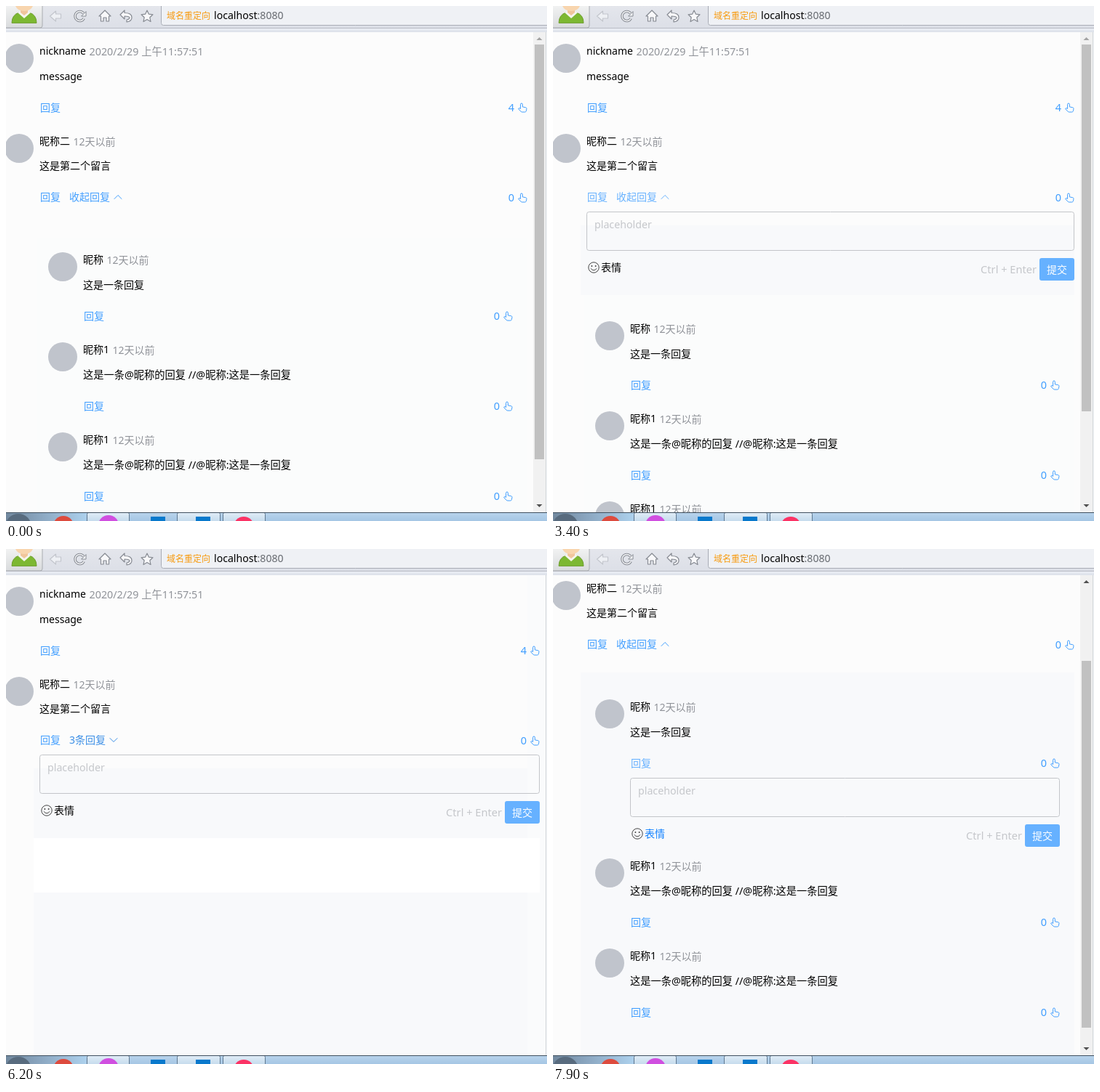
Recreate the animation shown at these times as an HTML page with a canvas. Size 744x709 px, loop 8 s.

```html
<!DOCTYPE html>
<html lang="zh-CN">
<head>
<meta charset="utf-8">
<title>留言板</title>
<style>
html, body { margin: 0; width: 100%; height: 100%; overflow: hidden; background: #fcfcfc; }
canvas { display: block; }
</style>
</head>
<body>
<canvas id="stage" width="744" height="709"></canvas>
<script>
const ctx = document.getElementById('stage').getContext('2d');
const LOOP = 8000;
const TOP = 36, BOTTOM = 697, VIEW = BOTTOM - TOP;
const EDITOR_H = 95, LIST_H = 432;
const BLUE = '#409eff', LIGHT = '#66b1ff', PRESSED = '#3a8ee6';
const PANEL = '#f8f9fb';

const within = (t, a, b) => t >= a && t < b;
const smooth = u => {
  u = Math.min(1, Math.max(0, u));
  return u * u * (3 - 2 * u);
};

function rect(x, y, w, h, fill) {
  ctx.fillStyle = fill;
  ctx.fillRect(x, y, w, h);
}

function circle(x, y, r, fill) {
  ctx.beginPath();
  ctx.arc(x, y, r, 0, 7);
  ctx.fillStyle = fill;
  ctx.fill();
}

function round(x, y, w, h, r, fill, stroke) {
  ctx.beginPath();
  ctx.roundRect(x, y, w, h, r);
  if (fill) { ctx.fillStyle = fill; ctx.fill(); }
  if (stroke) { ctx.strokeStyle = stroke; ctx.lineWidth = 1; ctx.stroke(); }
}

function path(d, x, y, stroke, width, fill) {
  ctx.save();
  ctx.translate(x, y);
  const p = new Path2D(d);
  if (fill) { ctx.fillStyle = fill; ctx.fill(p); }
  if (stroke) {
    ctx.strokeStyle = stroke;
    ctx.lineWidth = width;
    ctx.lineJoin = ctx.lineCap = 'round';
    ctx.stroke(p);
  }
  ctx.restore();
}

function text(s, x, y, fill, size = 14, align = 'left') {
  ctx.font = `${size}px "Noto Sans", "Noto Sans CJK SC", "Noto Sans CJK", sans-serif`;
  ctx.textAlign = align;
  ctx.fillStyle = fill;
  ctx.fillText(s, x, y);
  return ctx.measureText(s).width;
}

function vertical(y0, y1, ...colors) {
  const g = ctx.createLinearGradient(0, y0, 0, y1);
  colors.forEach((c, i) => g.addColorStop(i / (colors.length - 1), c));
  return g;
}

function stateAt(ms) {
  const t = Math.floor(ms / 100) * 100;
  const shut = t < 6250 ? smooth((t - 5000) / 290) : 1 - smooth((t - 6250) / 300);
  const editor = t < 1400 ? '' : t < 2600 ? 'first' : t < 7400 ? 'second' : 'nested';
  const content = 726 + (editor ? EDITOR_H : 0) - LIST_H * shut;
  return {
    t, shut, editor, content,
    bar: content > VIEW,
    scroll: t < 7800 ? 0 : t < 7900 ? 33 : 132,
    folded: within(t, 5000, 6300),
    emojiHot: within(t, 2600, 3200) || t >= 7400,
    reply1: within(t, 900, 1400) ? PRESSED : within(t, 600, 2600) ? LIGHT : BLUE,
    reply2: within(t, 2300, 5000) ? LIGHT : BLUE,
    reply3: t >= 7200 ? LIGHT : BLUE,
    toggle: within(t, 4400, 4700) || within(t, 6200, 6300) ? PRESSED
      : within(t, 3400, 7400) ? LIGHT : BLUE
  };
}

function thumbIcon(x, y) {
  path('M3.6 7.6V1.9a1.4 1.4 0 0 1 2.8 0V5.4l4.3.8q1.3.3 1.3 1.6l-.6 3.2q-.3 1.5-1.8 1.5H5.8q-1 0-1.7-.8L.9 8.5q-.4-1 .5-1.4.7-.3 1.4.3z',
    x, y - 6.5, BLUE, 1);
}

function editorBox(x, y, right, hot) {
  round(x + .5, y + .5, right - x - 1, 53, 3, null, '#c3c5c9');
  text('placeholder', x + 11, y + 23, '#c5c7cb', 14.2);
  const cx = x + 10, cy = y + 77;
  ctx.beginPath();
  ctx.arc(cx, cy, 7.2, 0, 7);
  ctx.strokeStyle = '#444';
  ctx.lineWidth = 1;
  ctx.stroke();
  circle(cx - 2.6, cy - 2, 1, '#444');
  circle(cx + 2.6, cy - 2, 1, '#444');
  path('M-4 1.5Q0 6.5 4 1.5', cx, cy, '#444', 1);
  text('表情', x + 20, y + 82, hot ? '#1080ff' : '#000');
  text('Ctrl + Enter', right - 52, y + 85, '#c5c7cb', 14.6, 'right');
  round(right - 48, y + 64, 48, 31, 3, LIGHT);
  text('提交', right - 24, y + 85, '#fff', 14, 'center');
}

// One comment; nudge shifts the lower rows by a pixel
function comment(x, y, right, c, s, nudge = 0) {
  circle(x + 20, y + 20, 20, '#c0c4cc');
  const tx = x + 48, low = y - nudge;
  const w = text(c.name, tx, y + 15, '#000');
  text(c.time, tx + w + 4.6, y + 16, '#909399', c.timeSize || 14);
  text(c.body, tx, low + 50, '#000', c.bodySize || 14);
  text('回复', tx + 1, low + 93, c.color || BLUE);
  if (c.toggle) {
    const tw = text(c.toggle, tx + 41, low + 93, s.toggle);
    const d = s.folded ? 'M0 -2.5L5 2.5L10 -2.5' : 'M0 2.5L5 -2.5L10 2.5';
    path(d, tx + 47 + tw, low + 88, s.toggle, 1);
  }
  text(c.likes, right - 18, y + 93, BLUE, 14.5, 'right');
  thumbIcon(right - 13, y + 88);
  if (c.open) editorBox(tx, low + 108, right, s.emojiHot);
}

function page(s) {
  const right = s.bar ? 717 : 734;
  const ago = '12天以前';
  ctx.save();
  ctx.beginPath();
  ctx.rect(0, TOP, 742, VIEW);
  ctx.clip();
  rect(0, TOP, 742, VIEW, '#fcfcfc');
  ctx.translate(0, -s.scroll);

  if (s.t >= 5200) {
    if (!s.bar) rect(717, TOP, 25, VIEW, '#fafbfc');
    rect(38, 302, 679, 600, PANEL);
    if (within(s.t, 5300, 6300)) rect(38, 398, 696, 75, '#fff');
  } else if (s.editor) {
    rect(38, 302, 679, 96, PANEL);
    rect(42, 398, 675, 300, '#fbfcfc');
  } else {
    rect(42, 320, 675, 380, '#fbfcfc');
  }

  comment(-2, 52, right, {
    name: 'nickname', time: '2020/2/29 上午11:57:51', timeSize: 14.3,
    body: 'message', likes: '4', color: s.reply1, open: s.editor === 'first'
  }, s);
  const y2 = 176 + (s.editor === 'first' ? EDITOR_H : 0);
  comment(-2, y2, right, {
    name: '昵称二', time: ago, body: '这是第二个留言', likes: '0',
    color: s.reply2, toggle: s.folded ? '3条回复' : '收起回复', open: s.editor === 'second'
  }, s, 1);

  if (s.shut < 1) {
    const listTop = y2 + 127 + (s.editor === 'second' ? EDITOR_H : 0);
    ctx.save();
    ctx.beginPath();
    ctx.rect(0, listTop, 742, LIST_H * (1 - s.shut) + (s.shut ? 0 : EDITOR_H));
    ctx.clip();
    let y = listTop + 36 - Math.round(24 * s.shut);
    for (let i = 0; i < 3; i++) {
      const open = i === 0 && s.editor === 'nested';
      comment(58, y, right - 20, {
        name: i ? '昵称1' : '昵称', time: ago, likes: '0', open,
        body: i ? '这是一条@昵称的回复 //@昵称:这是一条回复' : '这是一条回复',
        bodySize: i ? 14.25 : 14,
        color: i ? BLUE : s.reply3
      }, s);
      y += 124 + (open ? EDITOR_H : 0);
    }
    ctx.restore();
  }
  ctx.restore();
}

function scrollbar(s) {
  rect(742, TOP, 1, VIEW, '#d3d6da');
  rect(743, TOP, 1, VIEW, '#f4f6f9');
  if (!s.bar) return;
  rect(725, TOP, 17, VIEW, '#f1f1f1');
  const k = 627 / s.content;
  rect(727, Math.round(53 + s.scroll * k), 13, Math.round(VIEW * k), '#c1c1c1');
  path('M-4 2L0 -2L4 2Z', 733.5, 45, null, 0, s.scroll ? '#505050' : '#a3a3a3');
  path('M-4 -2L0 2L4 -2Z', 733.5, 688, null, 0, '#505050');
}

function toolbar() {
  rect(0, 0, 744, 31, vertical(0, 31, '#e4e6ec', '#dcdfe7'));
  rect(0, 30, 744, 1, '#b9bcc5');
  rect(0, 31, 744, 5, vertical(31, 36, '#eceff5', '#dbe0e9'));

  // User badge
  round(-4, -6, 54, 36, 3, vertical(0, 30, '#f1f2f2', '#d9dbdd'), '#a9acb0');
  path('M8 23Q8 12 18 9H32Q42 12 42 23Z', 0, 0, '#6c9c2c', 1, '#7db832');
  path('M16 9L20 7H30L34 9L25 17Z', 0, 0, null, 0, '#f5f5ee');
  path('M20 5H30V9L25 13L20 9Z', 0, 0, null, 0, '#f0c59c');
  path('M13 0H37Q34 7 25 7Q16 7 13 0Z', 0, 0, null, 0, '#f8d5ae');

  const ink = '#868a92';
  path('M8 -7L0 0L8 7V3H15V-3H8Z', 60.5, 14, '#c3c6cd', 1.2, '#eef0f4');
  ctx.beginPath();
  ctx.arc(101.5, 14, 6.5, .5, 5.6);
  ctx.strokeStyle = ink;
  ctx.lineWidth = 3.6;
  ctx.stroke();
  ctx.strokeStyle = '#f5f6f8';
  ctx.lineWidth = 1.4;
  ctx.stroke();
  path('M3 0H9V-6Z', 101, 14, ink, 1, '#f5f6f8');
  path('M0 -8L8 0H5.5V7H2V2H-2V7H-5.5V0H-8Z', 136, 14, ink, 1.2, '#f8f8fa');
  path('M-8 -2L-2 -8V-4.5Q8 -4.5 8 2Q8 7 1 8V5Q5 4 5 2Q4 0 -2 0V4Z', 165, 14, ink, 1.2, '#f8f8fa');
  path('M0 -8L2.4 -2.8L8 -2.2L3.8 1.7L5 7.5L0 4.6L-5 7.5L-3.8 1.7L-8 -2.2L-2.4 -2.8Z', 194, 14, ink, 1.2, '#f8f8fa');

  round(213.5, -5.5, 540, 32, 3, '#eff1f5', '#a9adb6');
  text('域名重定向', 221, 18, '#f79a0e', 12);
  const w = text('localhost', 286, 18, '#000', 14.1);
  text(':8080', 286 + w, 18, '#666a70', 14.1);
}

function taskbar() {
  rect(0, BOTTOM, 744, 12, vertical(BOTTOM, 709, '#b9d4ec', '#a5c6e4'));
  const g = ctx.createLinearGradient(0, 0, 110, 0);
  g.addColorStop(0, '#71889e');
  g.addColorStop(.45, '#8ca8c2');
  g.addColorStop(1, '#acd0ec');
  rect(0, BOTTOM, 110, 12, g);
  for (const [x, w] of [[111, 59], [235, 60], [298, 59]]) {
    round(x + .5, 697.5, w - 1, 18, 2, vertical(697, 709, '#e2edf7', '#c6dced'), '#5f7890');
  }
  circle(17, 717, 18, '#586b7e');
  circle(79, 716, 14, '#dd4b3e');
  circle(141, 715, 14, '#d04fe0');
  rect(199, 703, 20, 6, '#0879cc');
  rect(261, 703, 20, 6, '#0879cc');
  circle(327, 717, 14, '#fb3365');
  rect(0, 697, 744, 1, '#40505f');
}

const start = performance.now();
function draw() {
  const s = stateAt((performance.now() - start) % LOOP);
  page(s);
  scrollbar(s);
  toolbar();
  taskbar();
  requestAnimationFrame(draw);
}
draw();
</script>
</body>
</html>
```
